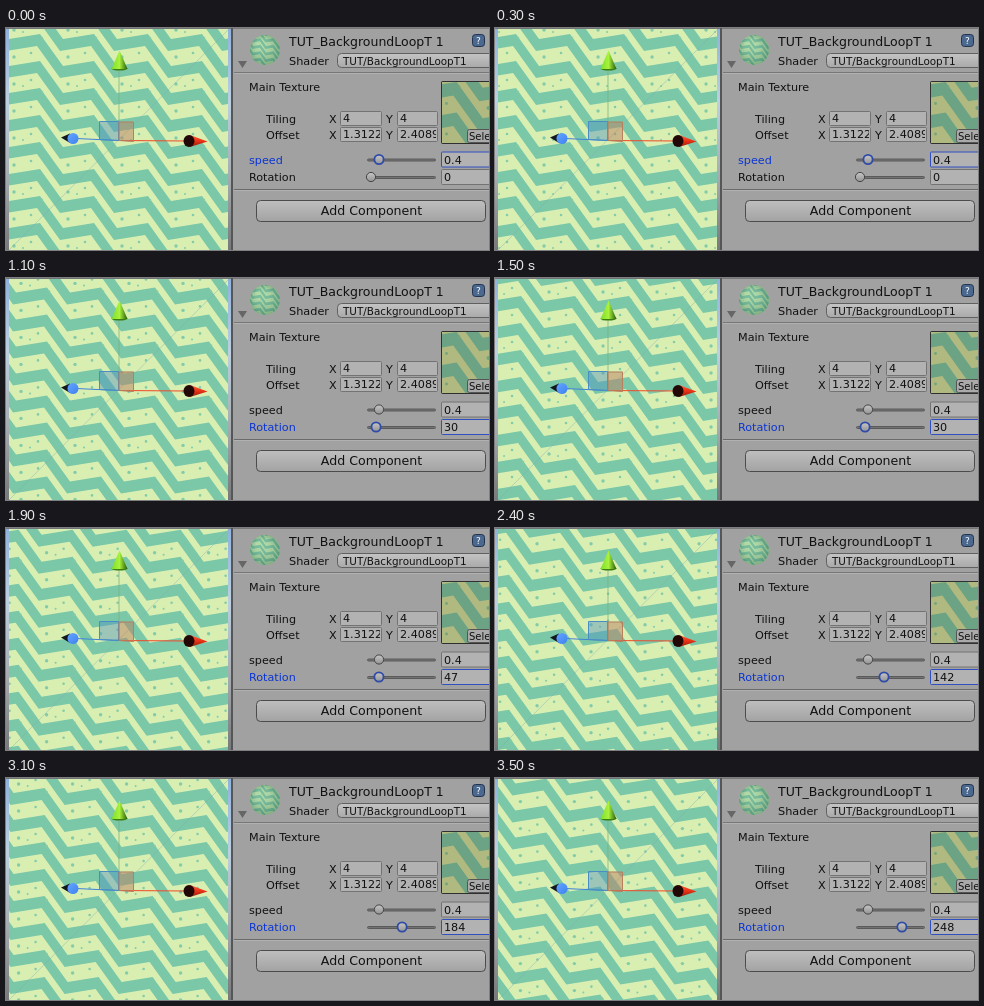
Recreate the animation shown at these times as an HTML page with a canvas. Size 483 by 222 pixels, loop 3600 ms.

```html
<!DOCTYPE html>
<html lang="en">
<head>
<meta charset="utf-8">
<title>Background loop shader</title>
<style>
html, body { margin: 0; width: 100%; height: 100%; overflow: hidden; background: #a3a3a3; }
canvas { display: block; width: 483px; height: 222px; }
</style>
</head>
<body>
<canvas id="stage" width="483" height="222"></canvas>
<script>
const ctx = document.getElementById('stage').getContext('2d');
const LOOP = 3600, STEP = 100, TILE = 54, ROW = 27, SPEED = 0.4;
const FONT = '"DejaVu Sans", Verdana, sans-serif';

// rotation slider: [time in ms, degrees]
const KEYS = [[0, 0], [700, 0], [1100, 30], [1500, 30], [1800, 47], [1900, 47],
  [2300, 142], [2900, 142], [3400, 248], [3600, 248]];

function rotationAt(t) {
  const i = Math.max(1, KEYS.findIndex(k => k[0] >= t));
  const [t0, a] = KEYS[i - 1], [t1, b] = KEYS[i];
  return Math.round(a + (b - a) * (t - t0) / (t1 - t0));
}

// scroll offset built up along the current direction
function scrollAt(t) {
  let x = 0, y = 10;
  for (let s = 0; s < t; s += STEP) {
    const a = rotationAt(s) * Math.PI / 180, d = SPEED * TILE * STEP / 1000 * 2;
    x -= Math.cos(a) * d;
    y += Math.sin(a) * d;
  }
  return [x, y];
}

function poly(points, fill, stroke, width = 1) {
  ctx.beginPath();
  points.forEach(p => ctx.lineTo(p[0], p[1]));
  ctx.closePath();
  if (fill) { ctx.fillStyle = fill; ctx.fill(); }
  if (stroke) { ctx.strokeStyle = stroke; ctx.lineWidth = width; ctx.stroke(); }
}

function line(x0, y0, x1, y1, color, width = 1) {
  ctx.beginPath();
  ctx.moveTo(x0, y0);
  ctx.lineTo(x1, y1);
  ctx.strokeStyle = color;
  ctx.lineWidth = width;
  ctx.stroke();
}

function oval(x, y, rx, ry, fill, stroke, width = 1) {
  ctx.beginPath();
  ctx.ellipse(x, y, rx, ry, 0, 0, 7);
  ctx.fillStyle = fill;
  ctx.fill();
  if (stroke) { ctx.strokeStyle = stroke; ctx.lineWidth = width; ctx.stroke(); }
}

function box(x, y, w, h, r, fill, stroke) {
  ctx.beginPath();
  ctx.roundRect(x + .5, y + .5, w - 1, h - 1, r);
  ctx.fillStyle = fill;
  ctx.fill();
  if (stroke) { ctx.strokeStyle = stroke; ctx.lineWidth = 1; ctx.stroke(); }
}

function shade(x0, y0, x1, y1, ...colors) {
  const g = ctx.createLinearGradient(x0, y0, x1, y1);
  colors.forEach((c, i) => g.addColorStop(i / (colors.length - 1), c));
  return g;
}

function text(s, x, y, size = 11.2, color = '#111', align = 'left') {
  ctx.font = `${size}px ${FONT}`;
  ctx.fillStyle = color;
  ctx.textAlign = align;
  ctx.textBaseline = 'alphabetic';
  ctx.fillText(s, x, y);
}

function clipped(path, draw) {
  ctx.save();
  ctx.beginPath();
  path();
  ctx.clip();
  draw();
  ctx.restore();
}

// each band steps down one row per tile: a gentle rise, then a steep drop
const EDGE = [[0, 0], [31, -5]];
const DOTS = [[5, 18, 1.7], [14, 20, 1], [22, 14, 1.3], [33, 26, 1.2]];

function texture(x, y, w, h, [ox, oy], scale, light, dark, dot) {
  ctx.fillStyle = light;
  ctx.fillRect(x, y, w, h);
  ctx.save();
  ctx.translate(x, y);
  ctx.scale(scale, scale);
  const mod = v => ((v % TILE) + TILE) % TILE;
  const cols = Math.ceil(w / scale / TILE) + 2, rows = Math.ceil(h / scale / ROW) + 4;
  ctx.translate(mod(ox) - TILE, mod(oy) - TILE);
  for (let r = -cols - 1; r < rows; r++) {
    const top = [], low = [];
    for (let c = -1; c <= cols; c++) {
      EDGE.forEach(([dx, dy]) => {
        const px = c * TILE + dx, py = (r + c) * ROW + dy;
        top.push([px, py]);
        low.unshift([px - 3, py + 12]);
      });
    }
    poly(top.concat(low), dark);
  }
  for (let r = -1; r < rows; r++) {
    for (let c = -1; c <= cols; c++) {
      DOTS.forEach(([dx, dy, q], i) => {
        if (i % 2 === 0 || r % 2) oval(c * TILE + dx, r * ROW + dy, q, q, dot);
      });
    }
  }
  ctx.restore();
}

function scene(t) {
  ctx.fillStyle = shade(0, 0, 0, 222, '#8fb2dc', '#bcd0e0', '#a6adb0', '#77797a');
  ctx.fillRect(0, 0, 226, 222);
  clipped(() => ctx.rect(3, 1, 219, 221), () =>
    texture(3, 1, 219, 221, scrollAt(t), 1, '#d9efb2', '#7bc8a9', '#83cba9'));
  line(3, 222, 222, 2, 'rgba(125,165,175,.5)', .8);
  ctx.fillStyle = '#6f7375';
  ctx.fillRect(0, 0, 226, 1);
  gizmo();
}

function gizmo() {
  line(113, 41, 113, 112, 'rgba(120,175,125,.75)');
  line(113, 112.5, 181, 113, '#ef4a2b', 1.2);
  line(70, 110.5, 113, 112.5, '#3f82d6', 1.1);

  poly([[93.5, 93.5], [128, 93.5], [128, 113.5], [93.5, 112]], 'rgba(95,160,180,.22)');
  poly([[93.5, 93.5], [112.5, 93.5], [112.5, 112.5], [93.5, 111.5]], 'rgba(70,135,200,.28)', '#4a8dc4');
  poly([[113, 94], [127.5, 94], [127.5, 113.5], [113, 112.5]], 'rgba(220,120,70,.38)', '#b77f5c');

  oval(113.5, 40.5, 8, 2, '#3c7d10');
  poly([[113.5, 22.5], [121.5, 41], [105.5, 41]], shade(106, 0, 121, 0, '#7fe02a', '#a8f13c', '#2f650c'));

  poly([[201.5, 113.5], [184, 107], [184, 119]], shade(0, 107, 0, 119, '#f7603b', '#ec3216', '#8e1c0c'));
  oval(183, 113, 5.5, 6, '#210705');

  poly([[55, 109.5], [64, 105.5], [64, 115]], '#111820');
  oval(67, 110.5, 5.5, 5.5, shade(62, 105, 72, 116, '#64a5ff', '#3f82ef'));
}

function field(x, y, w, h, s, on) {
  box(x, y, w, h, 1, '#b2b2b2', on ? '#304fc0' : '#737373');
  clipped(() => ctx.rect(x + 1, y, w - 3, h), () => text(s, x + 3, y + h - 4));
}

function slider(label, y, knob, value, on) {
  text(label, 243, y + 4, 11.2, on ? '#0b35d2' : '#111');
  box(361, y - 1, 69, 3, 1, '#737373', '#5a5a5a');
  oval(knob, y, 4.6, 4.6, shade(0, y - 5, 0, y + 5, '#c8c8c8', '#929292'),
    on ? '#2f4ba8' : '#444', on ? 1.8 : 1);
  field(435, y - 8, 52, 16, value, on);
}

function header() {
  clipped(() => ctx.arc(259, 22, 15, 0, 7), () => {
    texture(244, 7, 30, 30, [13, 19], .24, '#a9d69b', '#68b591', '#75b994');
    const g = ctx.createRadialGradient(255, 16, 3, 259, 22, 16);
    g.addColorStop(0, 'rgba(255,255,255,.12)');
    g.addColorStop(1, 'rgba(25,70,60,.3)');
    ctx.fillStyle = g;
    ctx.fillRect(244, 7, 30, 30);
  });
  poly([[232, 33], [241, 33], [236.5, 40]], '#666');
  text('TUT_BackgroundLoopT 1', 283, 18, 12.5);
  text('Shader', 283, 36.5, 11.3);
  box(331, 25, 160, 15, 4, shade(0, 25, 0, 40, '#c5c5c5', '#a8a8a8'), '#606060');
  text('TUT/BackgroundLoopT1', 337, 36.5, 10.4);
  box(466, 6, 13, 13, 3, '#4b688f', '#22334f');
  text('?', 472.5, 16, 9, '#fff', 'center');
  line(228, 44.5, 483, 44.5, '#777');
  line(228, 45.5, 483, 45.5, '#b1b1b1');
}

function inspector(t) {
  const rot = rotationAt(t), turning = t >= 700;
  ctx.fillStyle = '#a1a1a1';
  ctx.fillRect(226, 0, 257, 222);
  ctx.fillStyle = '#565656';
  ctx.fillRect(225, 0, 2, 222);
  line(227, .5, 483, .5, '#777');
  header();

  text('Main Texture', 243, 63, 11.2);
  text('Tiling', 260, 95);
  text('Offset', 260, 111);
  [[83, '4', '4'], [99, '1.3122', '2.4089']].forEach(([y, a, b]) => {
    text('X', 323, y + 12);
    field(334, y, 42, 15, a);
    text('Y', 380, y + 12);
    field(391, y, 41, 15, b);
  });

  box(435, 53, 60, 63, 1, '#333', '#303030');
  clipped(() => ctx.rect(436, 54, 47, 61), () =>
    texture(436, 54, 60, 61, [-18, 5], 1.13, '#b0b97f', '#6ba384', '#75a580'));
  box(461, 101, 34, 14, 2, '#aaa', '#555');
  text('Select', 463, 112, 10);

  slider('speed', 131.5, 373, '0.4', !turning);
  slider('Rotation', 149, 365 + rot * .169, String(rot), turning);

  line(228, 161.5, 483, 161.5, '#6a6a6a');
  line(228, 162.5, 483, 162.5, '#b1b1b1');
  box(250, 172, 230, 22, 4, shade(0, 172, 0, 194, '#bfbfbf', '#a2a2a2'), '#4c4c4c');
  text('Add Component', 365.5, 187, 12.6, '#111', 'center');
}

function frame(now) {
  const t = Math.floor(now % LOOP / STEP) * STEP;
  ctx.clearRect(0, 0, 483, 222);
  scene(t);
  inspector(t);
  requestAnimationFrame(frame);
}
frame(0);
</script>
</body>
</html>
```
